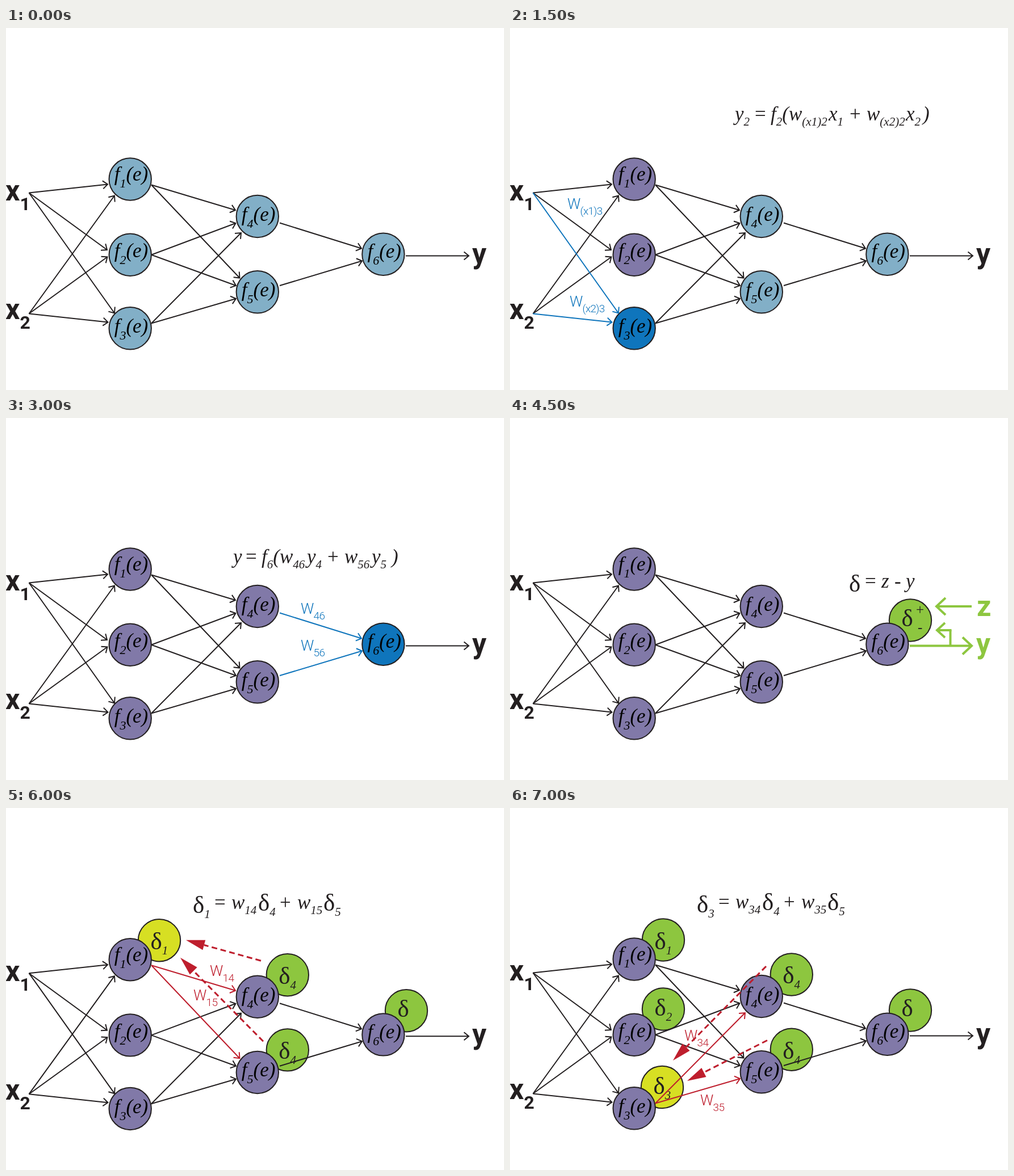
Write an HTML page that moves like this. It is 877 px wide and 638 px high and loops after 8000 ms.

```html
<!DOCTYPE html>
<html lang="en">
<head>
<meta charset="utf-8">
<title>Backpropagation</title>
<style>
  html, body { margin: 0; width: 100%; height: 100%; overflow: hidden; background: #fff; }
  svg { display: block; width: 100%; height: 100%; }
  text { white-space: pre; }
  .math { font: italic 35px "Liberation Serif", serif; }
  .sign { font: 35px "Liberation Serif", serif; }
  .small { font: 25px "Liberation Serif", serif; }
  .delta { font: 43px "Liberation Serif", serif; }
  .delta .sub { font-style: italic; }
  .port { font: 700 50px Roboto, sans-serif; }
  .weight { font: 300 26px Roboto, sans-serif; letter-spacing: -0.7px; }
</style>
</head>
<body>
<svg id="stage" viewBox="0 0 877 638"></svg>
<script>
const INK = '#231f20', IDLE = '#82afc7', DONE = '#8179a8', BLUE = '#0f75bc',
      GREEN = '#8dc63f', YELLOW = '#d7df23', RED = '#be1e2d';

// id: centre x, centre y, label baseline
const nodes = {
  1: [218.7, 266.5, 269], 2: [218.7, 399.7, 404], 3: [218.7, 529.3, 537],
  4: [442.8, 332, 340], 5: [442.8, 465.3, 472.5], 6: [664.4, 398.7, 405]
};
const deltas = {
  1: [270, 232.5, 248.5, 'δ_1'], 2: [270, 354.5, 366, 'δ_2'], 3: [268, 492, 504, 'δ_3'],
  4: [495.8, 293.5, 309, 'δ_4'], 5: [495.8, 425.7, 441.5, 'δ_4'], 6: [705, 356.5, 367, 'δ']
};
const backOrder = [6, 4, 5, 1, 2, 3];

// from, to, start, tip
const edges = [
  ['x1', 1, 40.5, 290.5, 179, 275.5], ['x1', 2, 40.5, 290.5, 178, 391], ['x1', 3, 40.5, 290.5, 191, 502.5],
  ['x2', 1, 40.5, 503.5, 191, 295.5], ['x2', 2, 40.5, 503.5, 178.5, 403.5], ['x2', 3, 40.5, 503.5, 179.5, 518.5],
  [1, 4, 256, 276.5, 404, 321], [1, 5, 256, 276.5, 411.5, 440.5],
  [2, 4, 256, 399.7, 404.5, 344], [2, 5, 256, 399.7, 405, 454],
  [3, 4, 256, 520.5, 414, 361], [3, 5, 256, 520.5, 405, 477],
  [4, 6, 482, 343.5, 626, 388.5], [5, 6, 482, 454, 627, 410.5]
];

// Formulas are "x:text" chunks; weights are [x, y, text]; pulls are [start, tip].
const inputStep = (time, node, k) => ({
  time, forward: node, base: 163,
  formula: `396:y_${k} 431:= 459:f_${k}( 491:w_(x1)${k} 561:x_1 598:+ 628:w_(x2)${k} 697:x_2 727:)`,
  weights: [[101, 319, `W_(x1)${node}`], [105, 491, `W_(x2)${node}`]]
});
const hiddenStep = (time, k, weights) => ({
  time, forward: k, base: 163, weights,
  formula: `328:y_${k} 363:= 391:f_${k}( 425:w_1${k} 471:y_1 508:+ 538:w_2${k} 585:y_2 623:+ 653:w_3${k} 700:y_3 731:)`
});
const outerBackStep = (time, k, weights, pulls) => ({
  time, back: k, base: 215, weights, pulls,
  formula: `480:δ_${k} 517:= 547:w_${k}6 595:δ`
});
const innerBackStep = (time, k, weights, pulls, shift = 0) => ({
  time, back: k, base: 177, weights, pulls, shift,
  formula: `329:δ_${k} 367:= 397:w_${k}4 444:δ_4 482:+ 513:w_${k}5 559:δ_5`
});

const steps = [
  { time: 0 },
  inputStep(500, 1, 1),
  inputStep(1000, 2, 3),
  inputStep(1500, 3, 2),
  hiddenStep(2000, 4, [[329, 279, 'W_14'], [329, 343, 'W_24'], [307, 407, 'W_34']]),
  hiddenStep(2500, 5, [[330, 338, 'W_15'], [329, 412, 'W_25'], [307, 484, 'W_35']]),
  { time: 3000, forward: 6, base: 256,
    formula: '400:y 422:= 450:f_6( 482:w_46 530:y_4 566:+ 596:w_56 644:y_5 679:)',
    weights: [[519, 345, 'W_46'], [519, 410, 'W_56']] },
  { time: 4500, back: 6, base: 299, formula: '597:δ 625:= 654:z 677:- 697:y' },
  outerBackStep(5000, 4, [[519, 345, 'W_46']], [[660, 338, 545, 300]]),
  outerBackStep(5500, 5, [[519, 410, 'W_56']], [[666, 382, 546, 421]]),
  innerBackStep(6000, 1, [[359, 295, 'W_14'], [330, 338, 'W_15']],
    [[449, 268.5, 317, 232], [453, 410.5, 307, 263]], 0.7),
  innerBackStep(6500, 2, [[329, 343, 'W_24'], [329, 412, 'W_25']],
    [[451, 276, 315, 336], [453, 410, 317, 368]]),
  innerBackStep(7000, 3, [[307, 410, 'W_34'], [335, 524, 'W_35']],
    [[451, 279, 287, 445], [453, 409.5, 312, 481]])
];

// "_" starts a subscript: digits or "(x1)2".
function label(x, y, str, cls, color = INK, subSize = 21, drop = 9) {
  const parts = str.split(/_(\(x\d\)\d|\d+)/).map((part, i) =>
    i % 2 ? `<tspan class="sub" dy="${drop}" font-size="${subSize}">${part}</tspan>`
          : `<tspan dy="${i ? -drop : 0}">${part}</tspan>`);
  return `<text class="${cls}" x="${x}" y="${y}" fill="${color}">${parts.join('')}</text>`;
}

const circle = (x, y, fill) =>
  `<circle cx="${x}" cy="${y}" r="37.2" fill="${fill}" stroke="${INK}" stroke-width="2"/>`;

const stroke = (d, color, width = 2, extra = '') =>
  `<path d="${d}" fill="none" stroke="${color}" stroke-width="${width}" ${extra}/>`;

// Two points beside the line and one on it, all a little behind the tip.
function barbs(x1, y1, x2, y2, back, side) {
  const len = Math.hypot(x2 - x1, y2 - y1), ux = (x2 - x1) / len, uy = (y2 - y1) / len;
  const bx = x2 - ux * back, by = y2 - uy * back;
  return [[bx - uy * side, by + ux * side], [bx + uy * side, by - ux * side], [bx, by]];
}

function arrow([x1, y1, x2, y2], color = INK, width = 2, back = 8.5, side = 7) {
  const [a, b] = barbs(x1, y1, x2, y2, back, side);
  return stroke(`M${x1} ${y1}L${x2} ${y2}M${a}L${x2} ${y2}L${b}`, color, width);
}

function pull([x1, y1, x2, y2]) {
  const [a, b, mid] = barbs(x1, y1, x2, y2, 33, 9);
  return stroke(`M${x1} ${y1}L${mid}`, RED, 3, 'stroke-dasharray="10 6"') +
    `<path d="M${a}L${x2} ${y2}L${b}Z" fill="${RED}"/>`;
}

function formula(text, base) {
  return text.split(' ').map((chunk, i) => {
    const [x, str] = chunk.split(':');
    if (str[0] === 'δ') return label(x, base + (i ? 3 : 7), str, 'delta');
    return label(x, base, str, '=+'.includes(str) ? 'sign' : 'math');
  }).join('');
}

function errorSignals() {
  return label(715, 346, '+', 'small') + label(718, 377, '-', 'small') +
    arrow([704, 401.5, 813, 401.5], GREEN, 4, 16, 15) +
    arrow([813, 332, 751, 332], GREEN, 4, 16, 15) +
    stroke('M775.5 402V374', GREEN, 4) +
    arrow([777.5, 374, 752, 374], GREEN, 4, 14, 13) +
    label(822, 349, 'z', 'port', GREEN);
}

function scene({ forward = 0, back = 0, base, formula: text, weights = [], pulls = [], shift = 0 }) {
  const comparing = back === 6;
  const shown = backOrder.slice(0, backOrder.indexOf(back) + 1);
  const accent = back ? RED : BLUE;
  let out = '';

  for (const id of shown) {
    const [x, y, baseline, name] = deltas[id];
    out += circle(x, y, id === back && !comparing ? YELLOW : GREEN) +
      label(x - 15.5, baseline, name, 'delta');
  }
  for (const id in nodes) {
    const [x, y, baseline] = nodes[id];
    const fill = back || id < forward ? DONE : id == forward ? BLUE : IDLE;
    out += circle(x, y, fill) + label(x - 28, baseline, `f_${id}(e)`, 'math', '#000', 22, 12);
  }
  const isActive = ([from, to]) => back ? from === back && !comparing : to === forward;
  for (const edge of [...edges].sort((a, b) => isActive(a) - isActive(b)))
    out += arrow(edge.slice(2), isActive(edge) ? accent : INK);

  out += comparing ? errorSignals() : arrow([704, 401.5, 815, 401.5]);
  out += label(-1, 304, 'x_1', 'port', INK, 32, 17) + label(-1, 513, 'x_2', 'port', INK, 32, 17) +
    label(821, 415, 'y', 'port', comparing ? GREEN : INK);
  for (const [x, y, name] of weights) out += label(x, y, name, 'weight', accent, 19, 10);
  out += pulls.map(pull).join('');
  if (text) out += formula(text, base);
  return `<g transform="translate(0 ${shift})">${out}</g>`;
}

const stage = document.getElementById('stage');
let current;
function tick() {
  const time = performance.now() % 8000;
  const step = steps.findLast(s => s.time <= time);
  if (step !== current) stage.innerHTML = scene(current = step);
  requestAnimationFrame(tick);
}
tick();
</script>
</body>
</html>
```
